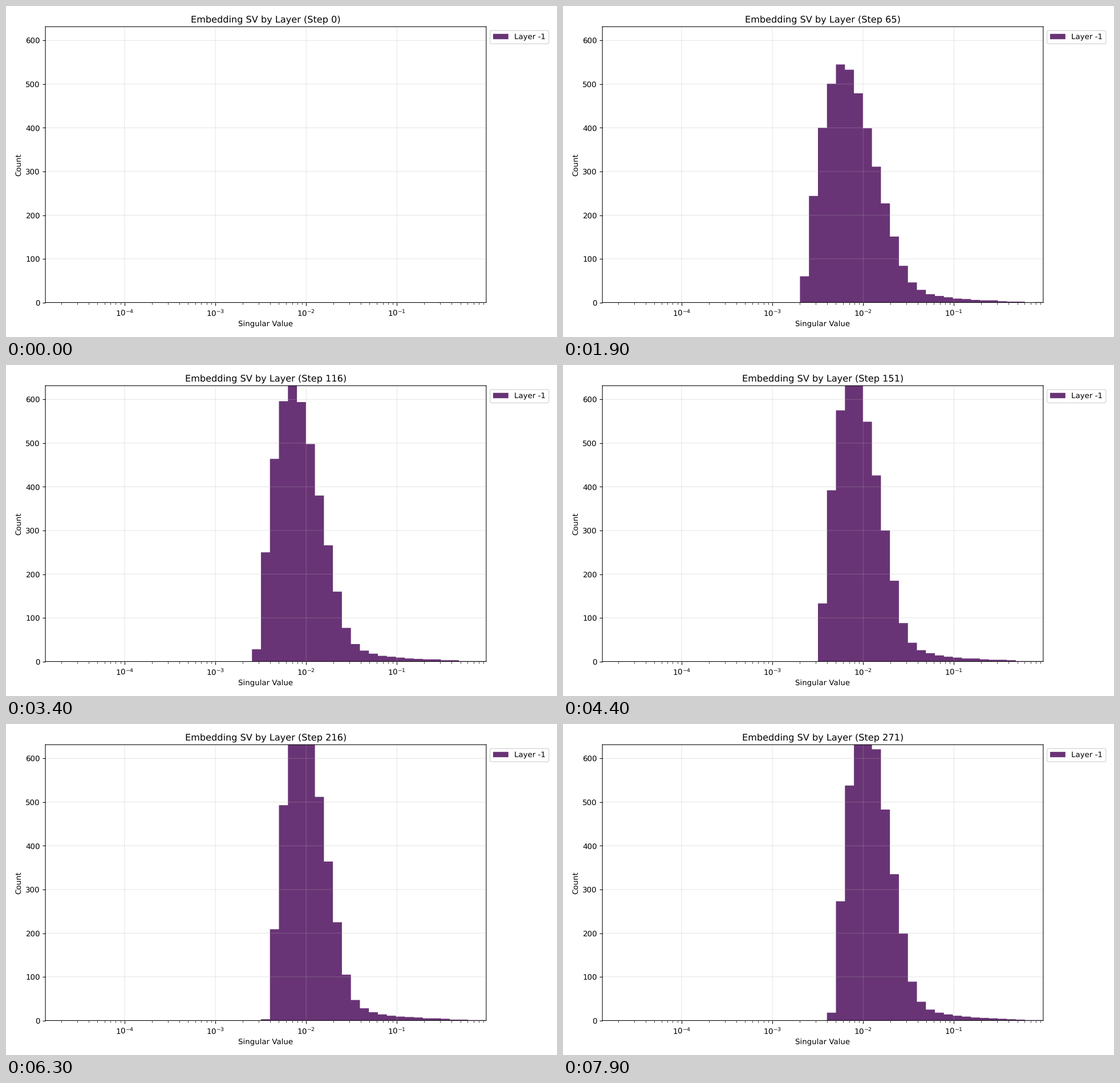
A matplotlib script that plays this animation: 966x580 px, repeating every 8000 ms.

```python
import numpy as np
import matplotlib.pyplot as plt
from matplotlib.animation import FuncAnimation

W, H, DPI = 966, 580, 96
FRAMES, INTERVAL = 80, 100
STEPS_PER_FRAME = 3.4375
VALUES, BINS = 4096, 49
LOG_MIN, LOG_MAX = -4.872, -0.0168
BAR_SHIFT = 0.0038  # bars sit about half a pixel left of the grid
LEFT, RIGHT, BOTTOM, TOP = 69.07, 841.87, 60.42, 543.75

# Training step -> median and spread of the singular values, in bins
KEY_STEPS = [3, 30, 65, 116, 182, 216, 271]
MEDIANS = [12, 24.93, 27.55, 28.12, 28.68, 28.95, 29.75]
SPREADS = [14.2, 9.5, 6.4, 5.5, 5.15, 4.9, 4.9]
LARGEST = 48.3
TAIL_POWER = 80

plt.rcParams.update({
    "font.family": "DejaVu Sans",
    "font.size": 10.06,
    "text.hinting": "no_hinting",
    "path.snap": False,
})

rank = (np.arange(VALUES) + 0.5) / VALUES
rayleigh = np.sqrt(-np.log(1 - rank))


def along_steps(step, points):
    return np.interp(np.log(step), np.log(KEY_STEPS), points)


def histogram(step):
    """Rayleigh-shaped bulk whose top values stretch out to a fixed maximum."""
    if step == 0:
        return np.zeros(BINS)
    spread = along_steps(step, SPREADS)
    low = along_steps(step, MEDIANS) - spread * np.sqrt(np.log(2))
    pos = low + spread * rayleigh
    pos += (LARGEST - pos[-1]) * rank ** TAIL_POWER
    return np.histogram(pos, bins=BINS, range=(0, BINS))[0]


fig = plt.figure(figsize=(W / DPI, H / DPI), dpi=DPI, facecolor="white")
ax = fig.add_axes([LEFT / W, BOTTOM / H, (RIGHT - LEFT) / W, (TOP - BOTTOM) / H])
ax.set_xscale("log")

edges = np.logspace(LOG_MIN, LOG_MAX, BINS + 1) / 10 ** BAR_SHIFT
bars = ax.stairs(np.zeros(BINS), edges, fill=True, color="#440154", alpha=0.8,
                 label="Layer -1")

ax.set_xlim(10 ** LOG_MIN, 10 ** LOG_MAX)
ax.set_ylim(0, 631.5)
ax.tick_params(axis="x", pad=4)
ax.set_xlabel("Singular Value", labelpad=4.5)
ax.set_ylabel("Count")
ax.grid(True, alpha=0.3)
ax.legend(loc="upper left", bbox_to_anchor=(1, 1))
title = ax.set_title("")


def draw(i):
    step = int(i * STEPS_PER_FRAME)
    bars.set_data(values=histogram(step))
    title.set_text(f"Embedding SV by Layer (Step {step})")
    return bars, title


anim = FuncAnimation(fig, draw, frames=FRAMES, interval=INTERVAL,
                     repeat=True, repeat_delay=0, blit=False)
plt.show()
```
